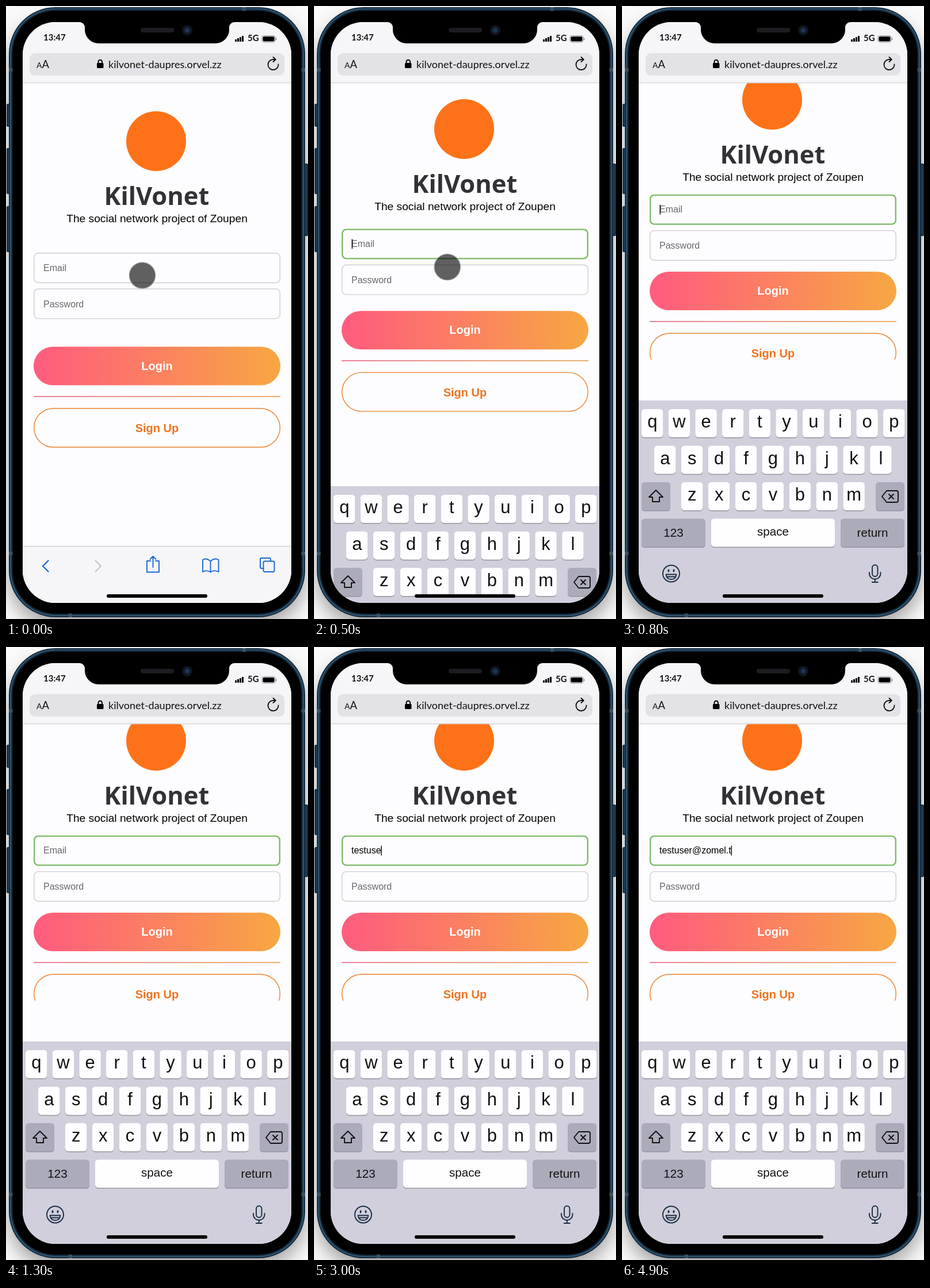
An HTML page for the animation above (5000 ms loop, 525 by 1066 pixels).

```html
<!DOCTYPE html>
<html lang="en">
<head>
<meta charset="utf-8">
<title>Login on a phone</title>
<style>
html, body { margin: 0; width: 100%; height: 100%; overflow: hidden; background: #fbfafb; }
svg { display: block; width: 100vw; height: 100vh; font-family: "Liberation Sans", Arial, sans-serif; }
.mid { text-anchor: middle; }
.bar { font-family: Lato, sans-serif; }
.bold { font-weight: 700; }
.line { fill: none; stroke-width: 1.9; stroke-linecap: round; stroke-linejoin: round; }
.blue { stroke: #1868d2; }
.ink { stroke: #1b2d42; }
.field { fill: #fdfcfe; stroke: #cfcdd2; stroke-width: 1.4; }
.hint { font-size: 16px; fill: #68666b; }
.shadow { filter: blur(16px); }

.intro, .fields, .buttons, .keyboard, .toolbar, .touch, .focus {
  animation: 5s -15ms step-end infinite;
}
.intro { animation-name: intro; }
.fields { animation-name: fields; }
.buttons { animation-name: buttons; }
.keyboard { animation-name: keyboard; }
.toolbar { animation-name: toolbar; }
.touch { animation-name: touch; }
.focus { animation-name: focus; fill: none; stroke: #7fbc6c; stroke-width: 2.4; }

@keyframes intro {
  0% { transform: none; }
  8% { transform: translateY(-5px); }
  10% { transform: translateY(-21px); }
  12% { transform: translateY(-70px); }
  14%, 100% { transform: translateY(-72px); }
}
@keyframes fields {
  0% { transform: none; }
  8% { transform: translateY(-10px); }
  10% { transform: translateY(-41.7px); }
  12% { transform: translateY(-98.7px); }
  14%, 100% { transform: translateY(-101.4px); }
}
@keyframes buttons {
  0% { transform: none; }
  8% { transform: translateY(-15px); }
  10% { transform: translateY(-62.3px); }
  12% { transform: translateY(-128.3px); }
  14%, 100% { transform: translateY(-130.5px); }
}
@keyframes keyboard {
  0% { transform: translateY(360px); }
  8% { transform: translateY(295px); }
  10% { transform: translateY(149px); }
  12% { transform: translateY(6px); }
  14% { transform: translateY(1px); }
  16%, 100% { transform: none; }
}
@keyframes toolbar {
  0% { visibility: visible; }
  8%, 100% { visibility: hidden; }
}
@keyframes focus {
  0% { visibility: hidden; }
  8%, 100% { visibility: visible; }
}
@keyframes touch {
  0% { transform: translate(237px, 468.5px); }
  2% { transform: translate(236px, 465px); }
  4% { transform: translate(234px, 460px); }
  6% { transform: translate(233px, 456px); }
  8% { transform: translate(231.8px, 454px); opacity: 1; }
  14% { transform: translate(231.8px, 454px); opacity: .5; }
  16%, 100% { transform: translate(231.8px, 454px); opacity: 0; }
}
</style>
</head>
<body>
<svg viewBox="0 0 525 1066">
  <defs>
    <linearGradient id="warm"><stop stop-color="#ff5b7f"/><stop offset="1" stop-color="#f7a742"/></linearGradient>
    <linearGradient id="rule" gradientUnits="userSpaceOnUse" x1="48" x2="476" y1="0" y2="0">
      <stop stop-color="#e6587a"/><stop offset="1" stop-color="#e09c3e"/>
    </linearGradient>
    <clipPath id="screen"><rect x="29" y="28" width="467" height="1010" rx="57"/></clipPath>
  </defs>

  <!-- phone body -->
  <rect width="525" height="1066" fill="#fbfafb"/>
  <rect class="shadow" x="5" y="22" width="515" height="1056" rx="81" fill="#000" fill-opacity=".35"/>
  <g fill="#1f3a50" stroke="#0f1f2c">
    <rect x="1.500" y="170.500" width="6" height="39" rx="1.500"/>
    <rect x="1.500" y="247.500" width="6" height="79" rx="1.500"/>
    <rect x="1.500" y="348.500" width="6" height="79" rx="1.500"/>
    <rect x="517.500" y="274.500" width="7" height="125" rx="1.500"/>
  </g>
  <rect x="5" y="2" width="515" height="1061" rx="81" fill="#122636"/>
  <rect x="8" y="5" width="509" height="1055" rx="78" fill="none" stroke="#2d526c" stroke-width="2.500"/>
  <path d="M414 2v7M112 1056v7M5 111h7M513 111h7M5 952h7M513 952h7" stroke="#3c5263" stroke-width="6"/>
  <rect x="11.500" y="8.500" width="502" height="1048" rx="74.500"/>

  <g clip-path="url(#screen)">
    <rect x="29" y="28" width="467" height="1010" fill="#fdfcfe"/>

    <!-- page -->
    <g class="intro">
      <circle cx="261" cy="235" r="52" fill="#fd7218"/>
      <text class="mid bold" x="262" y="346" font-size="43.500" fill="#333135" font-family="Noto Sans, sans-serif">KilVonet</text>
      <text class="mid" x="262.500" y="376" font-size="19.200">The social network project of Zoupen</text>
    </g>
    <g class="fields">
      <rect class="field" x="48.700" y="429.700" width="427.600" height="51.600" rx="7.500"/>
      <rect class="focus" x="49.200" y="430.200" width="426.600" height="50.600" rx="7"/>
      <text id="value" class="hint" x="65" y="460.500">Email</text>
      <path id="caret" d="M0 447v17" stroke="#111" stroke-width="1.500"/>
      <rect class="field" x="48.700" y="492" width="427.600" height="51.600" rx="7.500"/>
      <text class="hint" x="65" y="523.500">Password</text>
    </g>
    <g class="buttons mid bold" font-size="20">
      <rect x="48" y="592.500" width="429" height="67" rx="33.500" fill="url(#warm)"/>
      <text x="262.500" y="632.800" fill="#fff">Login</text>
      <rect x="48" y="678.400" width="429" height="1.500" fill="url(#rule)"/>
      <rect x="48.700" y="699.700" width="427.600" height="67.600" rx="33.800" fill="none" stroke="#e8812d" stroke-width="1.400"/>
      <text x="262.500" y="741" fill="#ef7420">Sign Up</text>
    </g>

    <!-- keyboard -->
    <g class="keyboard">
      <rect x="29" y="615" width="467" height="72" fill="#fdfcfe"/>
      <rect x="29" y="686" width="467" height="352" fill="#d0cfdb"/>
      <g id="keys" class="mid" fill="#111"></g>
      <path class="line" stroke="#111" d="M59 842 71 854H65V862H53V854H47ZM460 843H477Q480 843 480 846V860Q480 863 477 863H460L452 853ZM464 849l8 8m0-8-8 8"/>
      <g class="line ink">
        <circle cx="85.500" cy="987" r="14.500"/>
        <path d="M76.500 988.500H94.500Q93.500 997 85.500 997T76.500 988.500ZM78.500 992.500H92.500"/>
        <path d="M81 981v2M90 981v2" stroke-width="2.800"/>
        <rect x="435" y="972" width="9.500" height="20" rx="4.750"/>
        <path d="M430 985v2a9.700 9.700 0 0 0 19.500 0v-2M439.800 997v5m-5 0h10"/>
      </g>
    </g>

    <!-- browser toolbar -->
    <g class="toolbar">
      <rect x="29" y="939" width="467" height="99" fill="#f6f5f8"/>
      <path d="M29 939.500H496" stroke="#d3d2d6" stroke-width="1.500"/>
      <g class="line blue">
        <path d="M73.500 964.500 64 974l9.500 9.500" stroke-width="2.300"/>
        <path d="M155.500 964.500 165 974l-9.500 9.500" stroke="#c4c3c8"/>
        <path d="M251 965H245V984.500H266V965H260M255.500 976V957M250.500 962l5-5 5 5"/>
        <path d="M355.500 965.500Q348 959 342 963V984Q349 980 355.500 984.500 362 980 369.500 984V963Q363 959 355.500 965.500V984"/>
        <path d="M447 978H444.500Q442 978 442 975.500V962.500Q442 960 444.500 960H457.500Q460 960 460 962.500V965"/>
        <rect x="447.500" y="965.500" width="19" height="18.500" rx="2.500"/>
      </g>
    </g>

    <!-- status and address bars -->
    <rect x="29" y="28" width="467" height="106" fill="#f6f5f8"/>
    <path d="M29 133.500H496" stroke="#d6d5d9" stroke-width="1.500"/>
    <rect x="41" y="82" width="443" height="39" rx="9.500" fill="#e3e2e6"/>
    <g class="bar" fill="#111">
      <text class="bold" x="65" y="59.500" font-size="15">13:47</text>
      <text class="bold" x="420" y="61" font-size="15">5G</text>
      <text x="53" y="107.500" font-size="14">A<tspan font-size="18.500">A</tspan></text>
      <text x="178" y="107.500" font-size="18">kilvonet-daupres.orvel.zz</text>
    </g>
    <path d="M399.500 62v-4m4 4v-6m4 6v-8m4 8v-10" stroke="#000" stroke-width="3"/>
    <rect x="445" y="51.500" width="23" height="11.500" rx="3.500" fill="none" stroke="#8b8a8e"/>
    <rect x="446.500" y="53" width="20" height="8.500" rx="2.200"/>
    <path d="M469.500 55.500v4" stroke="#8b8a8e" stroke-width="1.500"/>
    <rect x="158" y="99" width="11.500" height="9" rx="1.500"/>
    <path class="line" d="M160.500 100V97a3.300 3.300 0 0 1 6.600 0v3" stroke="#000"/>
    <path class="line" d="M473.500 101.500A9 9 0 1 1 464 93h4.500M464.500 89l4.300 4-4.300 4" stroke="#111"/>
  </g>

  <!-- notch and home indicator -->
  <path d="M128 27v1a9 9 0 0 1 9 9v4a24 24 0 0 0 24 24H364a24 24 0 0 0 24-24v-4a9 9 0 0 1 9-9v-1Z"/>
  <rect x="234" y="38" width="58" height="8" rx="4" fill="#1d1c20"/>
  <circle cx="315" cy="42" r="9" fill="#11161f"/>
  <circle cx="315" cy="42" r="4.500" fill="#1b3355"/>
  <rect x="175" y="1023" width="175" height="6" rx="3"/>

  <g class="touch">
    <circle r="23" fill="#000" fill-opacity=".62" stroke="#ccc" stroke-opacity=".6" stroke-width="1.500"/>
  </g>
</svg>

<script>
const byId = id => document.getElementById(id);
const keys = byId('keys');

function add(tag, attrs, text = '') {
  const node = document.createElementNS(keys.namespaceURI, tag);
  for (const name in attrs) node.setAttribute(name, attrs[name]);
  node.textContent = text;
  keys.append(node);
}

function key(x, y, width, label = '', { fill = '#fefdff', size = 31, base = 32 } = {}) {
  const box = { x, width, height: 49, rx: 5.5 };
  add('rect', { ...box, y: y + 1.5, fill: '#95949f' });
  add('rect', { ...box, y, fill });
  add('text', { x: x + width / 2, y: y + base, 'font-size': size }, label);
}

const gray = { fill: '#acabba', size: 20.6, base: 31.5 };
const rows = [['qwertyuiop', 34, 701, 46.67], ['asdfghjkl', 56, 764.7, 46.9], ['zxcvbnm', 103, 828, 46.9]];
for (const [letters, left, y, pitch] of rows) {
  [...letters].forEach((letter, i) => key(left + i * pitch, y, 37.5, letter));
}
key(34, 828, 50, '', gray);
key(441, 828, 50, '', gray);
key(34, 891.5, 111, '123', gray);
key(155, 891.5, 215, 'space', { size: 20.6, base: 29.5 });
key(380, 891.5, 111, 'return', gray);

// Moment each character is typed, in tenths of a second.
const message = 'testuser@zomel.t';
const strokes = [14, 17, 20, 22, 25, 28, 30, 33, 37, 39, 41, 42, 44, 45, 47, 48];
const value = byId('value');
const caret = byId('caret');
const start = performance.now() - 15;
let shown = -1;

function draw() {
  const tick = Math.floor((performance.now() - start) % 5000 / 100);
  const count = strokes.filter(stroke => stroke <= tick).length;
  if (count !== shown) {
    shown = count;
    value.textContent = message.slice(0, count) || 'Email';
    value.style.fill = count ? '#000' : '';
    const end = count ? value.getComputedTextLength() : 0.7;
    caret.setAttribute('transform', `translate(${65.6 + end})`);
  }
  const visible = count > 0 || (tick >= 4 && tick < 9);
  caret.style.visibility = visible ? 'visible' : 'hidden';
  requestAnimationFrame(draw);
}
draw();
</script>
</body>
</html>
```
